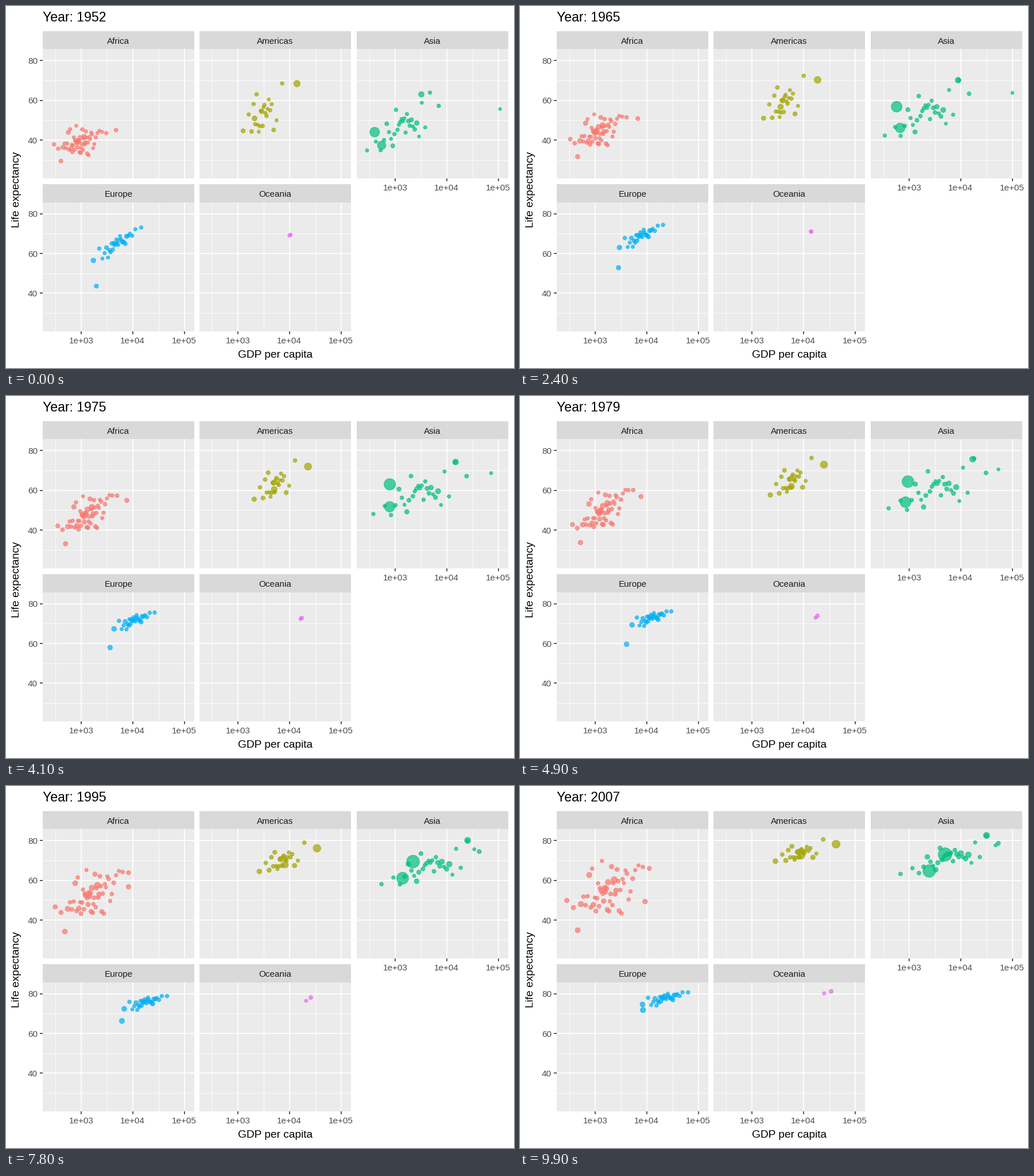
A matplotlib script for the animation above (10 s loop, 885 px wide and 632 px high).

```python
import numpy as np
import matplotlib.pyplot as plt
from matplotlib.animation import FuncAnimation
from matplotlib.colors import to_rgba
from matplotlib.patches import Rectangle

W, H, DPI = 885, 632, 100
PX = 72 / DPI
FRAMES = 100
FIRST, LAST = 1952, 2007
PANEL_W, STRIP_H, PANEL_H = 264, 31.2, 225.4
ROW_1, ROW_2 = 44, 311.4

rng = np.random.default_rng(7)
plt.rcParams["font.family"] = "Liberation Sans"


def along(keys, t):
    """Value at t in 0..1 on evenly spaced keys."""
    pos = t * (len(keys) - 1)
    i = min(int(pos), len(keys) - 2)
    return keys[i] + (keys[i + 1] - keys[i]) * (pos - i)


def bell(n):
    """Shuffled, evenly filled bell shape of about unit spread."""
    return rng.permutation(1.15 * np.arctanh(np.linspace(-.95, .95, n)))


class Crowd:
    """Small countries around a trend line; the line itself moves by stages.

    Each stage: mean log GDP, its spread, mean life, slope, scatter.
    """

    def __init__(self, n, growth, *stages):
        self.stages = np.array(stages)
        self.growth = growth
        self.wealth, self.luck = bell(n), bell(n)
        self.pop = 6 * np.exp(.9 * bell(n))

    def at(self, t):
        gdp, spread, life, slope, scatter = along(self.stages, t)
        dx = spread * self.wealth
        return (gdp + dx, life + slope * dx + scatter * self.luck,
                self.pop * (1 + (self.growth - 1) * t))


class Giant:
    """One outstanding country: population at both ends, GDP and life keys."""

    def __init__(self, pop, gdp, life):
        self.pop, self.gdp, self.life = pop, np.log10(gdp), life

    def at(self, t):
        return tuple(np.atleast_1d(along(k, t))
                     for k in (self.gdp, self.life, self.pop))


# name, panel left, strip top, colour, groups of dots
PANELS = [
    ("Africa", 64, ROW_1, "#F8766D", [
        Crowd(51, 3.2, (2.98, .24, 39, 3, 4), (3.15, .28, 49.5, 12, 5),
              (3.25, .38, 54.8, 7, 7.5)),
        Giant((13, 44), (4725, 7650, 7800, 9270), (45, 53, 61, 49.3))]),
    ("Americas", 337, ROW_1, "#A3A500", [
        Crowd(23, 2.2, (3.48, .18, 53, 22, 6), (3.76, .19, 65, 18, 3.5),
              (3.92, .22, 73.8, 9, 2.2)),
        Giant((150, 301), (13990, 21000, 30000, 42952), (68.4, 71, 75, 78.2)),
        Giant((57, 190), (2109, 4400, 7800, 9066), (50.9, 58.9, 65.3, 72.4))]),
    ("Asia", 611, ROW_1, "#00BF7D", [
        Crowd(29, 2.6, (3.15, .33, 47, 17, 5), (3.55, .45, 61, 10, 5),
              (3.78, .45, 71.5, 8.5, 3)),
        Giant((556, 1318), (400, 655, 1400, 4959), (44, 61.6, 67.4, 73)),
        Giant((372, 1110), (547, 720, 1010, 2452), (37.4, 49.4, 59, 64.7)),
        Giant((86, 127), (3217, 13000, 22500, 31656), (63, 72.8, 78.7, 82.6)),
        Giant((.2, 2.5), (108382, 98000, 28500, 47307),
              (55.6, 66.8, 74.5, 77.6))]),
    ("Europe", 64, ROW_2, "#00B0F6", [
        Crowd(29, 1.3, (3.7, .22, 65, 18, 1.8), (4.1, .18, 73, 9, 1.3),
              (4.36, .21, 77.8, 7, 1.2)),
        Giant((22, 71), (1969, 3250, 5150, 8458), (43.6, 56.3, 63.2, 71.8))]),
    ("Oceania", 337, ROW_2, "#E76BF3", [
        Giant((9, 20), (10040, 16000, 22000, 34435), (69.1, 71.7, 76.3, 81.2)),
        Giant((2, 4), (10557, 15700, 19000, 25185), (69.4, 71.7, 74.3, 80.2))]),
]


def px_x(left, log_gdp):
    return left + 67 + 89.8 * (log_gdp - 3)


def px_y(top, life):
    return top + 51.3 + 3.469 * (80 - life)


def diameter(pop):
    size = 1 + 5 * np.sqrt(pop / 1318)
    return 3.71 * size + 1.23


fig = plt.figure(figsize=(W / DPI, H / DPI), dpi=DPI, facecolor="white")
ax = fig.add_axes([0, 0, 1, 1])
ax.set_xlim(0, W)
ax.set_ylim(H, 0)
ax.axis("off")


def box(x, y, w, h, color):
    ax.add_patch(Rectangle((x, y), w, h, fc=color, ec="none", zorder=0))


def line(x0, y0, x1, y1, color, width):
    ax.plot([x0, x1], [y0, y1], color=color, lw=width * PX,
            solid_capstyle="butt", zorder=1)


def label(x, y, text, size, color="black", ha="center", **kw):
    kw.setdefault("va", "baseline")
    return ax.text(x, y, text, fontsize=size * PX, color=color, ha=ha, **kw)


def draw_panel(name, left, top):
    right, mid = left + PANEL_W, top + STRIP_H
    bottom = mid + PANEL_H
    box(left, top, PANEL_W, STRIP_H, "#D9D9D9")
    box(left, mid, PANEL_W, PANEL_H, "#EBEBEB")
    label((left + right) / 2, top + 21.5, name, 15.3, "#1A1A1A")
    for width, lives, gdps in ((.9, (30, 50, 70), (2.5, 3.5, 4.5)),
                               (1.7, (40, 60, 80), (3, 4, 5))):
        for life in lives:
            line(left, px_y(top, life), right, px_y(top, life), "white", width)
        for g in gdps:
            line(px_x(left, g), mid, px_x(left, g), bottom, "white", width)
    if left == 64:
        for life in (40, 60, 80):
            y = px_y(top, life)
            line(left - 5, y, left, y, "#333333", 1.6)
            label(55, y + 5.5, str(life), 15.3, "#4D4D4D", "right")
    if top == ROW_2 or name == "Asia":
        for g in (3, 4, 5):
            x = px_x(left, g)
            line(x, bottom, x, bottom + 5, "#333333", 1.6)
            label(x, bottom + 21, f"1e+0{g}", 15.3, "#4D4D4D")


dots = []
for name, left, top, color, _ in PANELS:
    draw_panel(name, left, top)
    rgba = to_rgba(color, .7)
    dots.append(ax.scatter([], [], facecolors=[rgba], edgecolors=[rgba],
                           linewidths=PX, zorder=3))

title = label(64, 27, "", 23, ha="left")
label(469, 614.5, "GDP per capita", 19.2)
label(18.5, 321, "Life expectancy", 19.2, rotation=90, va="center")


def update(i):
    t = i / (FRAMES - 1)
    title.set_text(f"Year: {round(FIRST + (LAST - FIRST) * t)}")
    for cloud, (_, left, top, _, groups) in zip(dots, PANELS):
        gdp, life, pop = map(np.concatenate, zip(*(g.at(t) for g in groups)))
        cloud.set_offsets(np.column_stack([px_x(left, gdp), px_y(top, life)]))
        cloud.set_sizes((diameter(pop) * PX) ** 2)
    return dots + [title]


anim = FuncAnimation(fig, update, frames=FRAMES, interval=100,
                     repeat=True, repeat_delay=0, blit=False)
plt.show()
```
